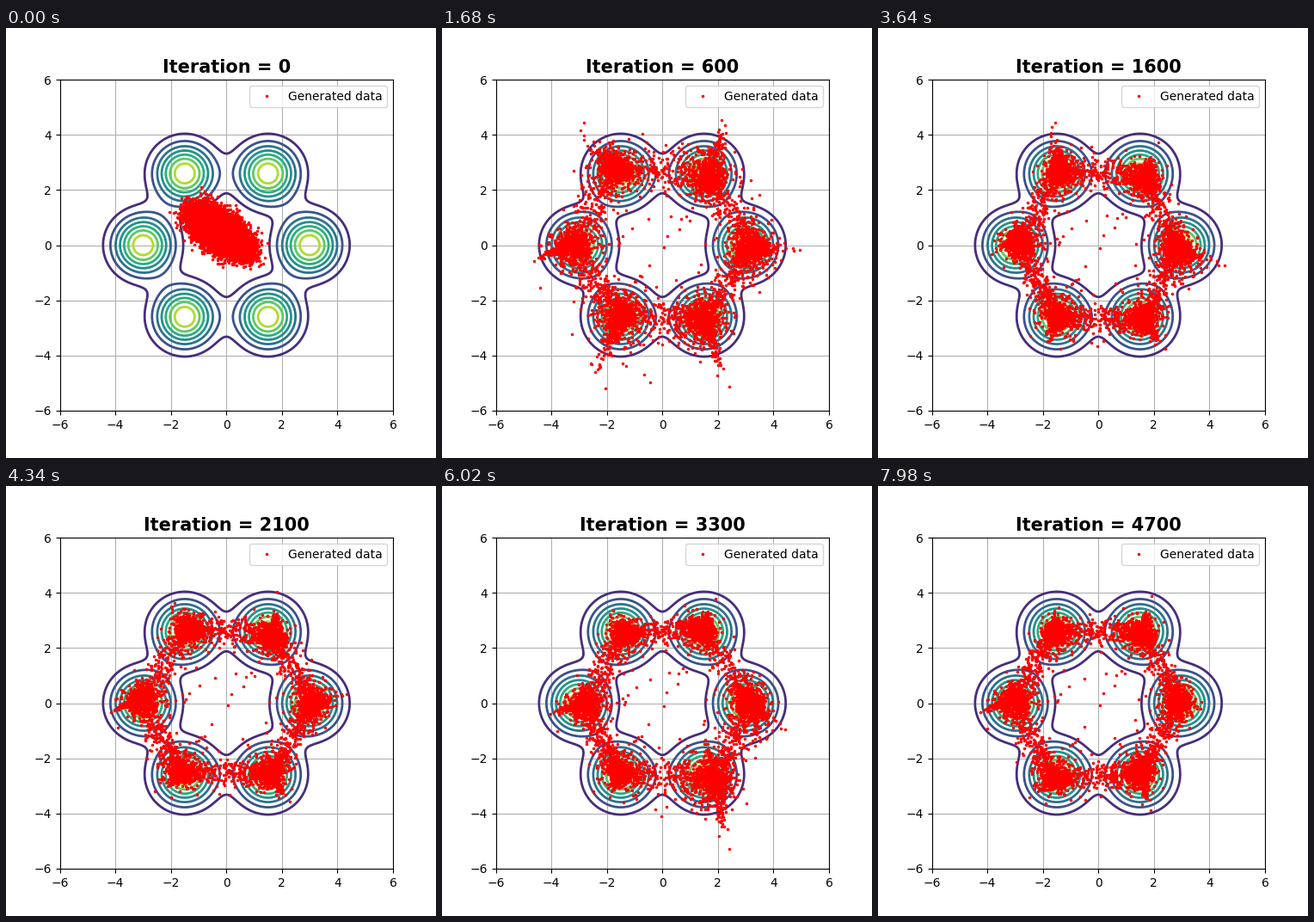
Write a matplotlib script that moves like this. It is 500x500 px and loops after 8 s.

```python
import numpy as np
import matplotlib.pyplot as plt
from matplotlib.animation import FuncAnimation

LOOP, INTERVAL, STEP = 8000, 40, 140
N, MODES = 6000, 6

rng = np.random.default_rng(7)
z = rng.normal(size=(N, 2))
noise = rng.normal(size=(N, 2)) * np.exp(0.35 * rng.normal(size=(N, 1)))
radius = np.hypot(z[:, 0], z[:, 1])[:, None]
reach = radius ** 2 / 2 - 1

# Each latent angle belongs to one mode and leans towards a neighbour.
turn = np.arctan2(z[:, 1], z[:, 0]) * MODES / (2 * np.pi)
mode = np.round(turn).astype(int)
lean = turn - mode
near = mode % MODES
side = (mode + np.where(lean >= 0, 1, -1)) % MODES
mix = (0.5 * (2 * np.abs(lean)) ** 4.5)[:, None]
inner = np.minimum(1, radius / 0.13)
taper = np.exp(-0.4 * np.maximum(reach, 0))

angles = np.arange(MODES) * 2 * np.pi / MODES
outward = np.column_stack([np.cos(angles), np.sin(angles)])
centers = 3 * outward

# Training makes every mode oscillate in place, direction and length.
rate = rng.uniform(0.5, 1.6, (4, MODES))
phase = rng.uniform(0, 2 * np.pi, (4, MODES))
pull = np.maximum(0, np.cos(angles + 0.8)) ** 3


def shape_at(step):
    """Core, tail vector and width of every mode."""
    dx, dy, swing, stretch = np.sin(rate * step + phase)
    burst = np.exp(-step / 10)
    spill = (pull * np.exp(-((step - 48) / 5) ** 2))[:, None]

    core = centers + 0.6 * burst * outward
    core = core + 0.14 * np.column_stack([dx, dy]) + spill * [0.7, -1.3]
    heading = angles + 0.35 * swing
    length = (0.17 + 0.62 * burst) * (1 + 0.3 * stretch)
    tail = length * np.array([np.cos(heading), np.sin(heading)])
    tail = tail.T + spill * [0, -0.8]
    width = 0.2 + 0.15 * burst + 0.35 * spill
    return core, tail, width


def ring(step):
    core, tail, width = shape_at(step)

    def place(k):
        return core[k] + tail[k] * reach + width[k] * noise * taper

    return (place(near) * (1 - mix) + place(side) * mix) * inner


def blob():
    a, b = (z * 2.1 * np.tanh(radius / 2) / radius).T
    cloud = np.column_stack([-0.25 + 0.72 * a, 0.5 - 0.38 * a + 0.46 * b])
    return cloud + 0.13 * noise


def points(step):
    stay = np.exp(-step)
    return blob() * stay + ring(step) * (1 - stay)


def iteration(step):
    return 50 * step + 50 * max(0, step - 20)


fig, ax = plt.subplots(figsize=(5, 5), dpi=100)
x, y = np.meshgrid(np.linspace(-6, 6, 241), np.linspace(-6, 6, 241))
density = sum(np.exp(-(x - cx) ** 2 - (y - cy) ** 2) for cx, cy in centers) / np.pi
ax.contour(x, y, density, levels=np.arange(1, 8) * 0.04, vmin=0, vmax=0.32,
           cmap="viridis", linewidths=2)
dots, = ax.plot([], [], "r.", markersize=3, label="Generated data")
ax.set(xlim=(-6, 6), ylim=(-6, 6))
ax.grid(True)
ax.legend(loc="upper right")
title = ax.set_title("", fontsize=15, fontweight="bold")


def draw(frame):
    step = int((frame + 0.5) * INTERVAL) // STEP
    dots.set_data(*points(step).T)
    title.set_text(f"Iteration = {iteration(step)}")
    return dots, title


anim = FuncAnimation(fig, draw, frames=LOOP // INTERVAL, interval=INTERVAL,
                     repeat=True, repeat_delay=0)
plt.show()
```
